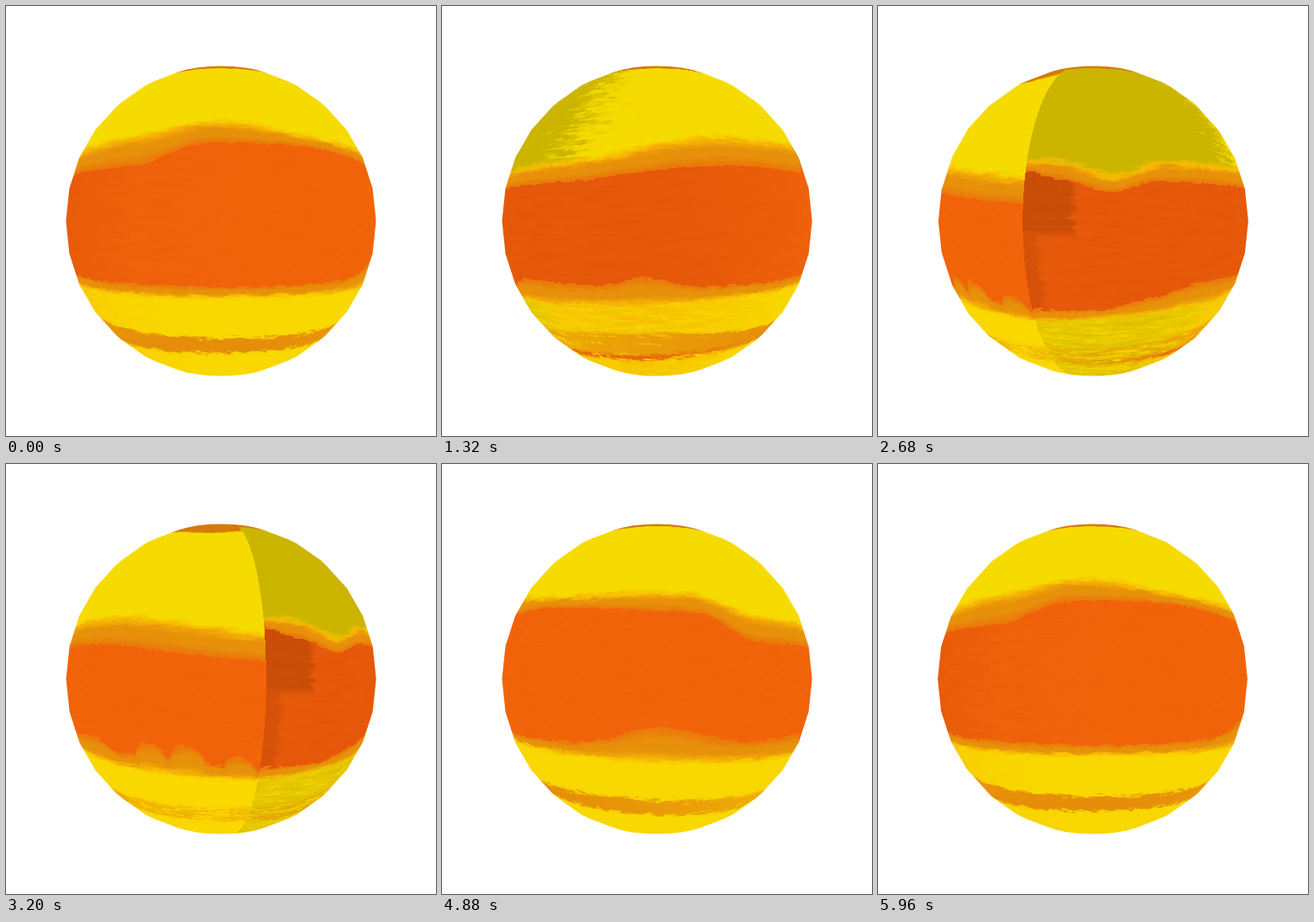
Recreate the animation shown at these times as an HTML page with a canvas. Size 512x512 px, loop 6000 ms.

```html
<!DOCTYPE html>
<html>
<head>
<meta charset="utf-8">
<style>
  html, body { margin: 0; height: 100%; overflow: hidden; background: #fff; }
  canvas { display: block; }
</style>
</head>
<body>
<canvas id="stage" width="512" height="512"></canvas>
<script>
const LOOP = 6000, STEP = 40;
const DIST = 3, FOCAL = 523, MID = 256;    // camera distance in radii, projection scale
const EDGE = 70, SIZE = 372;               // square around the globe
const TW = 1440, TH = 720, RES = 4;        // texture, cells per degree
const RAD = Math.PI / 180;

const ctx = document.getElementById('stage').getContext('2d');
const clamp = v => Math.max(0, Math.min(1, v));
const smooth = (a, b, v) => { const k = clamp((v - a) / (b - a)); return k * k * (3 - 2 * k); };
const bump = (v, center, width) => Math.exp(-(((v - center) / width) ** 2));
const mix = (a, b, k) => a.map((v, i) => v + (b[i] - v) * k);

function hash(x, y) {
  let h = Math.imul(x, 374761393) + Math.imul(y, 668265263);
  h = Math.imul(h ^ (h >>> 13), 1274126177);
  return ((h ^ (h >>> 16)) >>> 0) / 4294967296;
}
function noise(x, y) {
  const i = Math.floor(x), j = Math.floor(y), fx = smooth(0, 1, x - i), fy = smooth(0, 1, y - j);
  const row = n => hash(i, n) + (hash(i + 1, n) - hash(i, n)) * fx;
  return row(j) + (row(j + 1) - row(j)) * fy;
}

// Belt edges in degrees from the equator, and colour strengths, at one longitude
function climate(lon) {
  const wave = Math.cos(lon * RAD);
  const step = (from, to) => smooth(from, to, lon), hill = (at, width) => bump(lon, at, width);
  const dome = at => Math.sqrt(Math.max(0, 1 - ((lon - at) / 5) ** 2));
  return {
    beltN: 10.8 + 2.6 * hill(0, 8) - 3 * hill(24, 8) + 4.8 * step(70, 125) + 6 * step(154, 176)
      - 3.4 * step(195, 262) - 7.8 * step(258, 277) - 5.7 * step(300, 365),
    hazeN: 16.3 - 4.5 * hill(25, 10) + 7.5 * step(70, 125) + 4.5 * hill(180, 22)
      - 6.2 * step(255, 280) - 6 * step(312, 365),
    beltS: 25.5 - 7.5 * step(15, 58) - 2.6 * hill(98, 9) - 5 * hill(248, 15)
      + 4 * step(304, 314) + 5 * step(335, 362) - 4 * (dome(326) + dome(338) + dome(354)),
    hazeS: 21 + 8.5 * Math.abs(lon / 180 - 1) ** 1.6,
    top: 38.5 + 2.5 * wave - 4.5 * hill(85, 45),
    end: 46.5 + 3.5 * wave,
    cap: 61 - 8 * hill(345, 25),
    olive: 1 - .9 * step(25, 130),
    stripe: .75 - .3 * wave,
    red: hill(82, 50),
    rust: .9 * (1 - step(90, 190))
  };
}

const YELLOW = [246, 219, 0], OLIVE = [204, 181, 0], GOLD = [250, 190, 4], AMBER = [231, 145, 10],
  BURNT = [235, 122, 10], ORANGE = [242, 100, 10], RUST = [229, 88, 10], DARK = [202, 78, 8],
  CAP = [214, 122, 8], LEMON = [250, 216, 0], HONEY = [241, 175, 5];

// Haze runs from burnt orange at the belt through amber to gold
const haze = k => k < .4 ? mix(BURNT, AMBER, smooth(0, .4, k)) : mix(AMBER, GOLD, smooth(.6, 1.1, k));

function northColor(lat, c, n, m) {
  const top = c.hazeN + (n - .5) * 2.5, bottom = c.beltN + (m - .5) * 1.2;
  if (lat < bottom) return null;
  const sky = mix(YELLOW, OLIVE, smooth(.3, .7, c.olive * 1.3 - .25 + (n - .5) * .6));
  const col = mix(haze((lat - bottom) / (top - bottom)), sky, smooth(-.4, 1.8, lat - top));
  return mix(col, CAP, smooth(-1, 1, lat - c.cap - (n - .5) * 2));
}

function southColor(lat, lon, c, n, m) {
  const top = c.beltS + (m - .5) * 1.8, bottom = c.hazeS + (n - .5) * 2;
  if (lat < top) return null;
  const olive = 1 - smooth(40, 75, lon), gold = bump(lon, 95, 40);
  let col = mix(mix(LEMON, OLIVE, olive * n * .9), HONEY, gold * n * .8);
  col = mix(haze((lat - top) / (bottom - top)), col, smooth(-1, 1.4, lat - bottom));
  const a = lat - c.top - (n - .5) * 4, b = c.end - lat + (m - .5) * 4;
  const stripe = smooth(-.8, .8, a) * smooth(-.8, .8, b) * c.stripe;
  col = mix(col, AMBER, stripe * smooth(.1, .45, n + c.stripe - .65));
  return mix(col, RUST, bump(b, 0, 1.6) * c.red * smooth(.2, .5, n));
}

function beltColor(lat, lon, c, n) {
  const patch = (1 - smooth(13, 15, lon + (n - .5) * 3)) * smooth(-5, -2, lat);
  const rim = (1 - smooth(3, 6, lon + (n - .5) * 3)) * .6;
  const col = mix(mix(ORANGE, RUST, c.rust), DARK, Math.max(patch, rim));
  return col.map(v => v + (n - .5) * 5);
}

const texture = new Uint32Array(TW * TH);
for (let x = 0; x < TW; x++) {
  const lon = (x + .5) / RES, c = climate(lon);
  for (let y = 60; y < TH - 60; y++) {
    const lat = 90 - (y + .5) / RES;
    const n = noise(lon / 6, lat * 1.3) * .6 + noise(lon / 1.5 + 500, lat * 2.6) * .4;
    const m = noise(lon / 3 + 900, lat) * .6 + noise(lon * 1.2 + 1300, lat * 2) * .4;
    const col = (lat > 0 ? northColor(lat, c, n, m) : southColor(-lat, lon, c, n, m))
      || beltColor(lat, lon, c, n);
    texture[y * TW + x] = 0xff000000 | col[2] << 16 | col[1] << 8 | col[0];
  }
}

// Longitude column and texture row seen through each pixel
const column = new Float32Array(SIZE * SIZE), rowStart = new Int32Array(SIZE * SIZE);
for (let i = 0; i < SIZE * SIZE; i++) {
  const x = i % SIZE + EDGE + .5 - MID, y = Math.floor(i / SIZE) + EDGE + .5 - MID;
  const len = x * x + y * y + FOCAL * FOCAL, b = DIST * FOCAL;
  const s = (b - Math.sqrt(Math.max(0, b * b - (DIST * DIST - 1) * len))) / len;
  const px = x * s, py = y * s, pz = DIST - FOCAL * s;
  column[i] = Math.atan2(px, pz) / RAD * RES;
  const lat = Math.atan2(-py, Math.hypot(px, pz)) / RAD;
  rowStart[i] = Math.floor((90 - lat) * RES) * TW;
}

function project(lat, lon) {
  const c = Math.cos(lat * RAD), k = FOCAL / (DIST - c * Math.cos(lon * RAD));
  return [MID + k * c * Math.sin(lon * RAD), MID - k * Math.sin(lat * RAD)];
}

// Outline of the faceted sphere: union of the faces turned to the camera
function facets(turn) {
  const path = new Path2D(), d = 11.25;
  for (let lat = -90; lat < 90; lat += d) {
    for (let lon = turn; lon < turn + 360; lon += d) {
      const q = [project(lat, lon), project(lat, lon + d), project(lat + d, lon + d), project(lat + d, lon)];
      const area = (q[2][0] - q[0][0]) * (q[3][1] - q[1][1]) - (q[2][1] - q[0][1]) * (q[3][0] - q[1][0]);
      if (area >= 0) continue;
      q.forEach((p, i) => i ? path.lineTo(...p) : path.moveTo(...p));
      path.closePath();
    }
  }
  return path;
}

const image = ctx.createImageData(SIZE, SIZE), pixels = new Uint32Array(image.data.buffer);

function draw(t) {
  const turn = t / LOOP * 360 - 180, shift = TW * 2 - turn * RES;
  for (let i = 0; i < pixels.length; i++) {
    pixels[i] = texture[rowStart[i] + Math.floor(column[i] + shift) % TW];
  }
  ctx.putImageData(image, EDGE, EDGE);
  ctx.globalCompositeOperation = 'destination-in';
  ctx.fill(facets(turn));
  ctx.globalCompositeOperation = 'source-over';
}

const start = performance.now();
let last = -1;
function tick() {
  const t = Math.floor((performance.now() - start) % LOOP / STEP) * STEP;
  if (t !== last) draw(last = t);
  requestAnimationFrame(tick);
}
tick();
</script>
</body>
</html>
```
